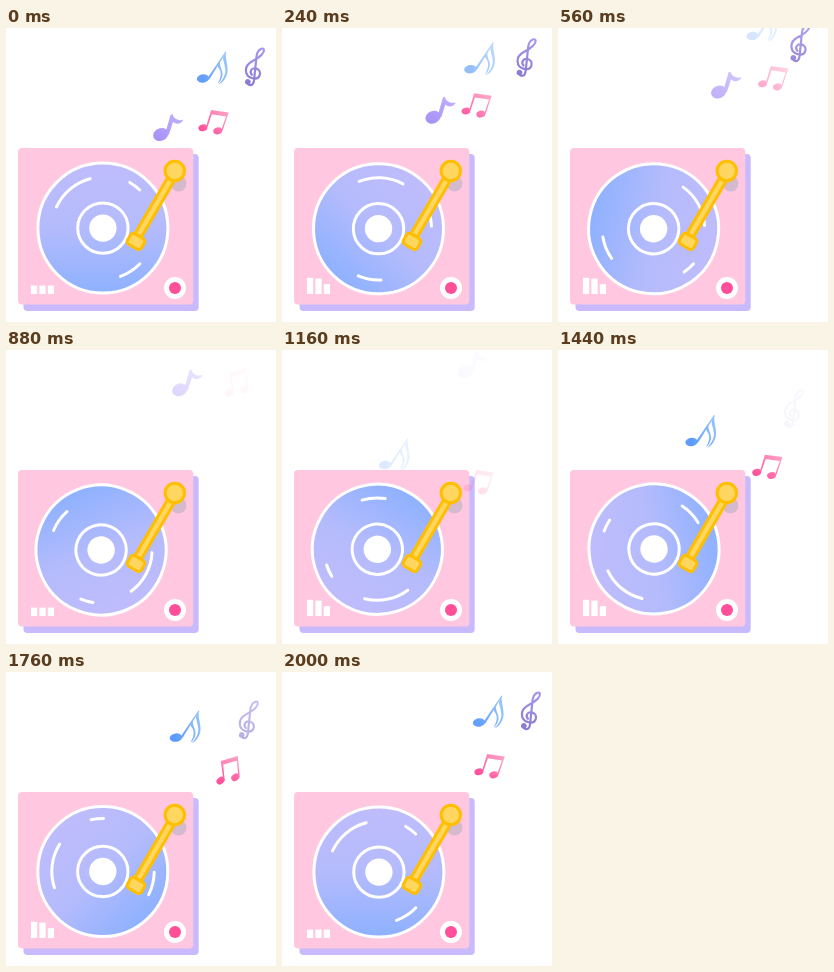
Animation, 270 px wide and 294 px high, one loop 2.04 s. Source, as an HTML page:

```html
<!DOCTYPE html>
<html lang="en">
<head>
<meta charset="utf-8">
<title>Record player</title>
<style>
  html, body { margin: 0; width: 100%; height: 100%; overflow: hidden; background: #fff; }
  svg { display: block; width: 100vw; height: 100vh; }
  .line { fill: none; stroke: #fff; stroke-width: 3; stroke-linecap: round; }
</style>
</head>
<body>
<svg viewBox="0 0 270 294">
  <defs>
    <linearGradient id="vinyl" x1="0" y1="0" x2="0" y2="1">
      <stop offset="0" stop-color="#bfbcfc"/>
      <stop offset=".5" stop-color="#b4bbfc"/>
      <stop offset="1" stop-color="#8eb1ff"/>
    </linearGradient>
    <linearGradient id="violet" gradientUnits="userSpaceOnUse" x1="-5" y1="5" x2="20" y2="-18">
      <stop offset="0" stop-color="#a791f8"/>
      <stop offset="1" stop-color="#c0affb"/>
    </linearGradient>
    <linearGradient id="rose" gradientUnits="userSpaceOnUse" x1="-12" y1="8" x2="8" y2="-12">
      <stop offset="0" stop-color="#ff4f9b"/>
      <stop offset="1" stop-color="#ff9cc3"/>
    </linearGradient>
    <linearGradient id="sky" gradientUnits="userSpaceOnUse" x1="0" y1="0" x2="24" y2="-8">
      <stop offset="0" stop-color="#5c9bfb"/>
      <stop offset="1" stop-color="#8fc0fb"/>
    </linearGradient>
    <linearGradient id="plum" gradientUnits="userSpaceOnUse" x1="0" y1="-20" x2="0" y2="20">
      <stop offset="0" stop-color="#a79bec"/>
      <stop offset="1" stop-color="#8979d4"/>
    </linearGradient>
  </defs>

  <rect x="17.5" y="126" width="175.2" height="157" rx="4" fill="#c8bafd"/>
  <rect x="12" y="120" width="175.3" height="156.5" rx="4" fill="#ffc8e0"/>

  <g id="disc">
    <circle r="65" fill="url(#vinyl)" stroke="#fff" stroke-width="3"/>
    <circle class="line" r="25.2"/>
    <circle r="13.7" fill="#fff"/>
  </g>

  <g id="bars" fill="#fff"></g>
  <circle cx="169" cy="260" r="11" fill="#fff"/>
  <circle cx="169" cy="260" r="6" fill="#ff4f99"/>

  <circle cx="172.5" cy="155.5" r="8" fill="#d5bacf"/>
  <g fill="#ffd760" stroke="#ffbf00" stroke-width="3" stroke-linejoin="round">
    <path d="M162 149L129 205.500L135.500 209L168.500 152.500Z"/>
    <circle cx="168.800" cy="143" r="9.700"/>
    <rect x="-8" y="-6" width="16" height="12" rx="3" transform="translate(130 213.500) rotate(30)"/>
  </g>

  <g id="quaver" fill="url(#violet)">
    <ellipse rx="7.800" ry="6.200" transform="rotate(-20)"/>
    <path d="M5-2L11-19.500L13-19.500C13.500-15.500 17-12.500 23.500-13.500C21.500-9.500 16-8.500 13-12L8 1Z"/>
  </g>

  <g id="pair" fill="url(#rose)">
    <ellipse cx="-11.300" cy="5.400" rx="4.500" ry="3.400" transform="rotate(-12 -11.300 5.400)"/>
    <ellipse cx="3.400" cy="9" rx="4.500" ry="3.400" transform="rotate(-12 3.400 9)"/>
    <path d="M-8.200 5L-2.500-12L15-9L8.200 9H6.700L12.200-5.200L-1.800-7.700L-6.800 5Z"/>
  </g>

  <g id="semi" fill="url(#sky)">
    <ellipse rx="6.200" ry="4.200" transform="rotate(-8)"/>
    <path d="M4.800-1L22.500-27L23.500-26.500L6.300 1Z"/>
    <path d="M23-26.500C21.500-20 26-12 24.200-5C22.500 1 19 4.500 15.500 6C19.500 2 23-4 22.300-9C22-14 20-17 20-21Z"/>
    <path d="M17-17.500C16-12 20.500-8 19.500-3C18.500 1 17 3.500 14.500 5C17 1 18.300-3 17.500-7C16.500-10 14.500-11 14.500-14Z"/>
  </g>

  <g id="clef" fill="none" stroke="url(#plum)" stroke-width="2.100" stroke-linecap="round">
    <g transform="rotate(17) scale(1.040)">
      <path d="M-2.500 16.500C-1 20 4 19 3 13L-1.500-10C-2.500-17 2-20 3.500-18C5.500-14-1-7-4-4C-11 3-7 12 1 11.500C9 11 8 1.500 2 1.500C-3 1.500-4 6.500-.5 8.500"/>
      <circle cx="-2.200" cy="16.200" r="1.700" fill="url(#plum)"/>
    </g>
  </g>
</svg>

<script>
const STEP = 40, LOOP = 2040, TURN = 2000, BEAT = 280;
const $ = id => document.getElementById(id);
const clamp = v => Math.max(0, Math.min(1, v));

function add(parent, tag, attrs) {
  const el = document.createElementNS('http://www.w3.org/2000/svg', tag);
  for (const k in attrs) el.setAttribute(k, attrs[k]);
  parent.append(el);
  return el;
}

function arc(r, from, to) {
  const p = deg => {
    const a = deg * Math.PI / 180;
    return `${(r * Math.cos(a)).toFixed(2)} ${(r * Math.sin(a)).toFixed(2)}`;
  };
  add($('disc'), 'path', { class: 'line', d: `M${p(from)}A${r} ${r} 0 0 1 ${p(to)}` });
}
arc(51, 204.5, 255.5);
arc(53, -59.5, -46);
arc(51.4, 44, 70);

const bars = [7.8, 7, 1.4].map((grow, i) =>
  ({ grow, el: add($('bars'), 'rect', { x: 25 + i * 8.4, width: 6.2 }) }));

// Each note drifts along a smooth path, one waypoint per beat.
const notes = [
  { id: 'quaver', born: 0, fadeIn: STEP, hold: 300, end: 1200, lean: -3, swing: 0,
    path: [[154.7, 106.5], [151.2, 86], [160.7, 64], [172, 43], [183, 22]] },
  { id: 'pair', born: 1160, fadeIn: 200, hold: 1000, end: 1760, lean: -2, swing: -25,
    path: [[197, 132], [209.8, 116.6], [223, 100], [208, 94], [195, 74], [215.7, 50], [229, 35], [242, 20]] },
  { id: 'semi', born: 1160, fadeIn: 200, hold: 800, end: 1600, lean: 0, swing: 0,
    path: [[103, 115], [133.5, 92], [165, 68.5], [197, 50.5], [187.5, 38.5], [194.5, 8], [200, -20]] },
  { id: 'clef', born: 1440, fadeIn: 600, hold: 1080, end: 1400, lean: 0, swing: 0,
    path: [[236, 58], [241.8, 49], [249, 38.5], [244, 27.5], [242.5, 14.5], [241, 1]] }
];

// Catmull-Rom curve through evenly timed points.
function along(path, beat) {
  const i = Math.min(Math.floor(beat), path.length - 2), u = Math.min(1, beat - i);
  const [a, b, c, d] = [-1, 0, 1, 2].map(k =>
    path[Math.max(0, Math.min(path.length - 1, i + k))]);
  return [0, 1].map(j => b[j] + u / 2 * (c[j] - a[j]
    + u * (2 * a[j] - 5 * b[j] + 4 * c[j] - d[j]
    + u * (3 * (b[j] - c[j]) + d[j] - a[j]))));
}

function drawNote(n, t) {
  const age = t < n.born ? t + TURN - n.born : t - n.born;
  const beat = age / BEAT;
  const [x, y] = along(n.path, beat);
  const tilt = n.lean + n.swing * Math.max(0, Math.sin(Math.PI * (beat - 1) / 2));
  const alpha = clamp(Math.min((age + STEP) / n.fadeIn, (n.end - age) / (n.end - n.hold)));
  $(n.id).setAttribute('transform', `translate(${x} ${y}) rotate(${tilt})`);
  $(n.id).setAttribute('opacity', alpha);
}

function draw(now) {
  const t = Math.floor((now % LOOP) / STEP) * STEP;
  $('disc').setAttribute('transform',
    `translate(96 199.9) rotate(${t / TURN * 360}) translate(.9 .2)`);

  const level = clamp(3 * Math.abs(Math.sin(Math.PI * (t + 60) / 1000)) - .6);
  for (const { el, grow } of bars) {
    const h = 8.4 + grow * level;
    el.setAttribute('y', 266 - h);
    el.setAttribute('height', h);
  }

  for (const n of notes) drawNote(n, t);
}

let start;
function tick(now) {
  start ??= now;
  draw(now - start);
  requestAnimationFrame(tick);
}
draw(0);
requestAnimationFrame(tick);
</script>
</body>
</html>
```
